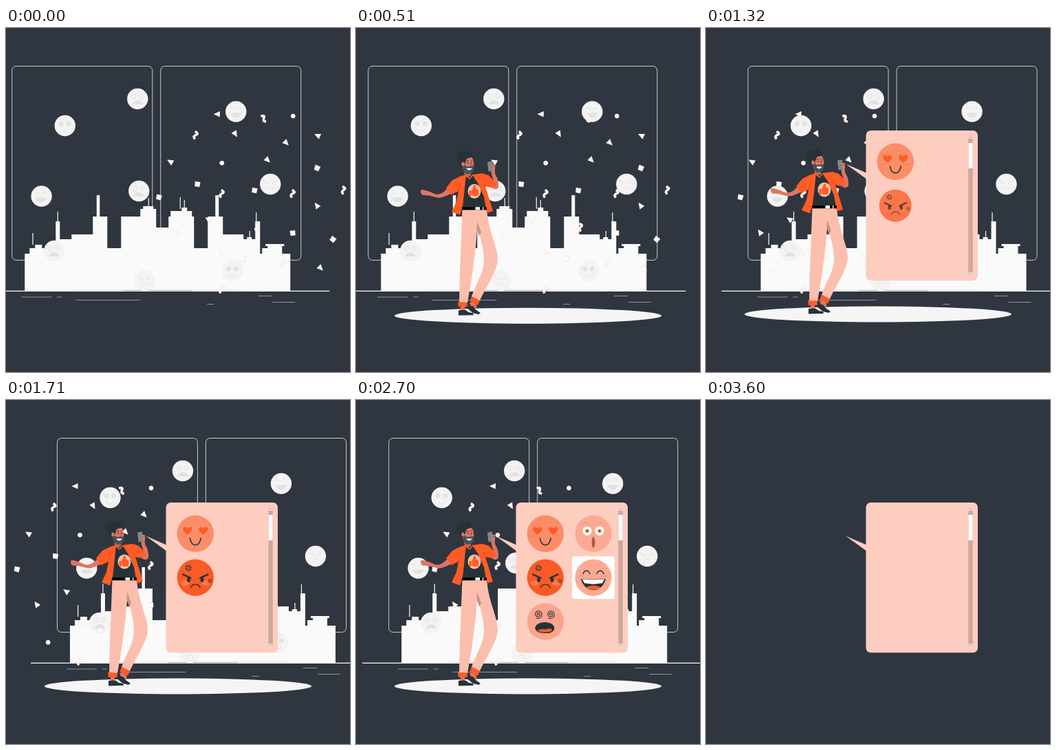
Write an HTML page with a canvas that moves like this. It is 500x500 px and loops after 3630 ms.

```html
<!DOCTYPE html>
<html lang="en">
<head>
<meta charset="utf-8">
<title>Choosing a reaction</title>
<style>
html, body { margin: 0; width: 100%; height: 100%; overflow: hidden; background: #2f3640; }
canvas { display: block; width: 100vw; height: 100vh; }
</style>
</head>
<body>
<canvas id="stage" width="500" height="500"></canvas>
<script>
const ctx = document.getElementById('stage').getContext('2d');
const LOOP = 3630, TAU = Math.PI * 2;
const BG = '#2f3640', PALE = '#fafafa', DARK = '#263238', ORANGE = '#ff5c26',
      SKIN = '#df7564', PEACH = '#fcaa93', TROUSER = '#fcbfae', PANEL = '#fdcdc0';

const clamp = v => Math.max(0, Math.min(1, v));
const outCubic = p => 1 - (1 - clamp(p)) ** 3;

// ---- Drawing helpers ----
function fill(color, path) {
  ctx.fillStyle = color;
  ctx.fill(path);
}
function stroke(color, width, path) {
  ctx.strokeStyle = color;
  ctx.lineWidth = width;
  ctx.stroke(path);
}
function oval(x, y, rx, ry = rx) {
  const p = new Path2D();
  p.ellipse(x, y, rx, ry, 0, 0, TAU);
  return p;
}
function box(x, y, w, h, r = 0) {
  const p = new Path2D();
  p.roundRect(x, y, w, h, r);
  return p;
}
function track(...pts) {
  const p = new Path2D();
  for (const [x, y] of pts) p.lineTo(x, y);
  return p;
}
// Closed curve through the points
function loop(...pts) {
  const p = new Path2D(), n = pts.length, get = i => pts[(i + n) % n];
  p.moveTo(...pts[0]);
  pts.forEach((a, i) => {
    const before = get(i - 1), b = get(i + 1), after = get(i + 2);
    p.bezierCurveTo(a[0] + (b[0] - before[0]) / 6, a[1] + (b[1] - before[1]) / 6,
      b[0] - (after[0] - a[0]) / 6, b[1] - (after[1] - a[1]) / 6, b[0], b[1]);
  });
  return p;
}
// Arch from x - w to x + w whose middle lies h below the ends
function arch(x, y, w, h) {
  const p = new Path2D();
  p.moveTo(x - w, y);
  p.bezierCurveTo(x - w * 0.7, y + h * 1.33, x + w * 0.7, y + h * 1.33, x + w, y);
  return p;
}
function at(x, y, draw, { scale = 1, turn = 0, alpha = 1 } = {}) {
  ctx.save();
  ctx.translate(x, y);
  ctx.rotate(turn);
  ctx.scale(scale, scale);
  ctx.globalAlpha *= alpha;
  draw();
  ctx.restore();
}

// ---- City ----
// Roof steps: left edge, height of the roof
const ROOFS = [
  [27, 328], [34, 320], [42, 315], [52, 320], [72, 281], [78, 307], [95, 300], [126, 274],
  [131.5, 243], [136, 274], [147, 320], [167, 274], [195, 263], [199, 259], [214, 263], [218, 290],
  [236, 274], [239, 266], [255, 261], [263, 266], [270, 274], [273, 320], [293, 274], [304, 243],
  [309, 274], [315, 300], [345, 307], [350, 304], [357, 307], [362, 281], [369, 328], [372, 320],
  [380, 314], [401, 328], [413, 382]
];
const MASTS = [[38.7, 298], [75, 267], [207, 247], [253, 246], [259, 250], [354, 295], [363.5, 268]];
const STREAKS = [[22, 66, 391], [74, 81, 391], [101, 195, 395.5], [292, 302, 401.5], [366, 386, 389.5], [387, 420, 398.5]];
const BUBBLES = [
  [85.5, 142, 'love'], [191, 103, 'sad'], [51.3, 244.5, 'laugh'], [193, 237, 'dizzy'], [70, 324, 'dizzy'],
  [201.5, 367, 'angry'], [329, 353, 'love'], [334, 121.5, 'laugh'], [384, 227, 'angry']
];

function skyline() {
  const p = new Path2D();
  let floor = 382;
  p.moveTo(27, floor);
  for (const [x, y] of ROOFS) {
    p.lineTo(x, floor);
    p.lineTo(x, floor = y);
  }
  return p;
}
function faintFace(mood) {
  const ink = '#e2e2e2';
  fill('#f3f3f3', oval(0, 0, 15.2));
  for (const x of [-5.5, 5]) {
    if (mood === 'love') fill(ink, oval(x, -3, 3.5));
    else if (mood === 'angry') stroke(ink, 1.4, track([x * 1.8, -5], [x * 0.5, -1]));
    else if (mood === 'laugh') stroke(ink, 1, arch(x, -3, 3, -3));
    else stroke(ink, 1, oval(x, -4, 3));
  }
  if (mood === 'love') stroke(ink, 1, arch(0, 5, 5, 4));
  else if (mood === 'angry') stroke(ink, 1, arch(0, 8, 5, -4));
  else fill(ink, arch(0, mood === 'laugh' ? 2 : 8, 8, mood === 'laugh' ? 7 : -6));
}
function drawCity() {
  for (const x of [8.5, 224.5]) stroke(PALE, 0.75, box(x, 55.5, 204, 282, 6));
  fill(PALE, skyline());
  fill(PALE, box(377, 314, 27, 3));
  for (const [x, y] of MASTS) stroke(PALE, 1.2, track([x, y], [x, y + 17]));
  stroke(PALE, 1.1, track([-30, 382.4], [470, 382.4]));
  stroke('#c9ccca', 0.8, track([95, 381.3], [345, 381.3]));
  stroke('#8f9493', 0.7, track([170, 381.7], [270, 381.7]));
  for (const [from, to, y] of STREAKS) stroke('#b9bdbf', 0.7, track([from, y], [to, y]));
  for (const [x, y, mood] of BUBBLES) at(x, y, () => faintFace(mood));
}

// ---- Confetti: x, y, turn in degrees ----
const TRIANGLES = [
  [307, 125, 180], [333, 154, 60], [407, 167, 45], [453, 156, 205], [380, 192, 45], [239, 194, 210],
  [452, 258, 235], [457, 349, 45], [294, 278, 215], [251, 297, 235], [314, 325, 235]
];
const SQUARES = [
  [278, 227, 5], [222, 246, 10], [361, 236, 8], [452, 203.5, 20], [416.5, 298, -8], [475, 307, 35], [344, 335, 15]
];
const RIBBONS = [
  [275, 156, 0], [374.5, 132, -45], [313, 241, 0], [416, 241, 0],
  [490, 236, -10], [364, 290, -15], [403, 342, 5], [313, 380, 5]
];
const DOTS = [[417.3, 128], [313.8, 196.3], [267.5, 352.3]];

function drawConfetti() {
  const rim = '#fbcabb', paper = '#fffaf8';
  const scatter = (list, draw) => list.forEach(([x, y, deg = 0]) => at(x, y, draw, { turn: deg * TAU / 360 }));
  const solid = path => () => {
    stroke(rim, 1, path);
    fill(paper, path);
  };
  const wave = new Path2D();
  wave.moveTo(0, -5.6);
  wave.bezierCurveTo(6, -2, 2, -1, 0, 0);
  wave.bezierCurveTo(-3, 2, -2, 3, -0.5, 5.4);
  scatter(TRIANGLES, solid(track([4.8, 0], [-3.4, -3.8], [-3.4, 3.8])));
  scatter(SQUARES, solid(track([-3.6, -3.4], [3.8, -3], [3.2, 3.5], [-3.3, 3])));
  scatter(DOTS, solid(oval(0, 0, 3)));
  scatter(RIBBONS, () => {
    stroke(rim, 3.7, wave);
    stroke(paper, 2.8, wave);
  });
}

// ---- Man ----
function drawLegs() {
  fill(SKIN, track([152, 401], [158, 401], [158, 409], [152, 409]));
  fill(SKIN, track([165, 397], [172, 395], [176, 404], [169, 406]));
  fill(DARK, track([149, 408], [159, 407.5], [164, 411], [170, 412], [171, 415], [149, 415.5]));
  fill(DARK, track([160, 402], [170, 402], [174, 407], [181, 412], [178, 414], [170, 412], [160, 404]));
  const knee = new Path2D();
  knee.moveTo(174, 262);
  knee.lineTo(190, 262);
  knee.bezierCurveTo(193, 295, 207, 318, 206, 335);
  knee.bezierCurveTo(205, 352, 188, 376, 180, 394);
  knee.lineTo(168, 388);
  knee.bezierCurveTo(174, 370, 187, 352, 186, 334);
  knee.bezierCurveTo(185, 310, 176, 292, 176, 278);
  fill(TROUSER, knee);
  fill(TROUSER, track([154.5, 261], [190, 261], [191, 276], [177, 279], [174, 316], [168, 362], [162, 397], [150, 397], [151, 350]));
  fill('#c69384', track([176, 279], [182, 295], [179, 300], [175.5, 290]));
  fill(ORANGE, track([148, 396], [162, 396.5], [161.5, 403], [149, 403]));
  fill(ORANGE, track([168, 387.5], [180, 394], [177, 401], [165.5, 395]));
}
function drawArms() {
  fill(SKIN, loop([134, 231], [126, 237], [117, 239.5], [105, 235], [95, 233], [96, 240], [107, 241.5], [120, 244.5], [130, 242], [141, 236]));
  fill(SKIN, loop([194, 221], [199, 231], [206.5, 230], [206, 218], [202, 209], [202, 199], [197, 201], [197, 210], [200, 221]));
  fill('#858585', track([191, 192.5], [198, 191.5], [199.5, 205], [192.5, 206.5]));
  fill(SKIN, box(197, 196, 5, 2.5, 1));
  fill(SKIN, box(197, 201, 5, 2.5, 1));
}
function drawTorso() {
  fill(DARK, track([156, 212], [172, 211], [182, 220], [190, 259], [154, 259]));
  fill('#c9604f', track([157, 204], [167, 204], [167, 212], [163, 215], [158, 213]));
  fill(ORANGE, track([152, 213], [160, 211], [157, 240], [155, 257], [151, 269.5], [139, 265], [146, 250], [149, 235], [138, 240], [131, 230], [140, 219]));
  fill(ORANGE, track([169, 211], [184, 209], [193, 212], [200, 219], [204, 226], [198, 230], [188, 228], [194, 247], [199, 264], [190, 266.5], [186, 243], [177, 223]));
  stroke('#c7441a', 0.7, track([149, 235], [152, 224]));
  stroke('#c7441a', 0.7, track([188, 228], [184, 221]));
  stroke(ORANGE, 1.5, track([159, 212], [165, 217], [170, 211]));
  fill(TROUSER, oval(172, 235, 9.5, 10.5));
  fill(ORANGE, box(164.5, 234, 3.3, 8, 0.5));
  fill(ORANGE, box(168.3, 232, 10, 10, 3));
  fill(ORANGE, track([168.5, 235], [171, 227], [173.5, 226], [175, 234]));
  fill('#050505', box(154, 258, 36, 4.2));
  fill('#fff', box(173.5, 258, 6.5, 4.2));
  fill('#fff', box(184, 258, 1.3, 4.2));
}
function drawHead() {
  fill(SKIN, loop([155, 190], [162, 186], [169, 187], [171, 199], [164, 208], [156, 202]));
  fill(DARK, loop([146, 184], [150, 178], [158, 176.5], [167, 178], [168, 185], [161, 188], [158, 196], [154, 200], [148, 193]));
  fill('#46525a', loop([155.5, 196], [161, 199], [167, 198.5], [171.5, 199], [169, 208], [161, 209.5], [156, 204]));
  fill(SKIN, oval(155.5, 195.5, 2.2, 3));
  fill('#fff', arch(164.5, 201.6, 4, 3));
  stroke(DARK, 0.9, track([160.5, 191.5], [164, 190.5]));
  stroke(DARK, 0.9, track([166.5, 190.5], [168.5, 191]));
  for (const x of [162.8, 168]) fill(DARK, oval(x, 194, 0.8, 1));
  stroke('#b14f40', 0.7, track([166, 193], [168, 197], [165.5, 197.5]));
}
function drawMan() {
  fill('#f5f5f5', oval(250, 416, 194, 11.5));
  drawLegs();
  drawArms();
  drawTorso();
  drawHead();
}

// ---- Panel and reactions ----
function drawPanel() {
  fill(PANEL, track([203, 197.5], [234, 211], [234, 220]));
  fill(PANEL, box(232.5, 149, 162.5, 218.3, 7));
  fill('#cca79c', box(381.3, 156.5, 6.5, 202.5));
  fill('#fff', box(381.5, 167, 6, 37));
  for (const [y, tip] of [[156.5, -1], [354.5, 1]]) {
    fill('#eee0dc', box(381.5, y, 6, 4.5));
    stroke('#9a7f77', 0.8, track([383, y + 2.2 - tip], [384.5, y + 2.2 + tip], [386, y + 2.2 - tip]));
  }
}

const disc = color => fill(color, oval(0, 0, 26.7));
const pair = (gap, draw) => [-gap, gap].forEach(draw);

function heart() {
  const p = new Path2D();
  p.moveTo(0, 5.5);
  p.bezierCurveTo(-11, -1, -6, -10, 0, -3.5);
  p.bezierCurveTo(6, -10, 11, -1, 0, 5.5);
  fill(ORANGE, p);
}
function spiral(x, y) {
  const p = new Path2D();
  for (let a = 0; a < 15; a += 0.3) p.lineTo(x + Math.cos(a) * a * 0.43, y + Math.sin(a) * a * 0.43);
  stroke(DARK, 1.1, p);
}
function vein() {
  for (let i = 0; i < 4; i++) at(0, 0, () => stroke(DARK, 1.3, track([1.3, 4.5], [1.5, 1.5], [4.5, 1.3])), { turn: i * TAU / 4 });
}
function blush(y) {
  pair(17.5, x => pair(1.5, d => stroke(ORANGE, 0.8, track([x + d - 1, y + 1], [x + d + 1, y]))));
}
function loveFace() {
  disc('#fb8d69');
  pair(11.5, x => at(x, -4, heart));
  stroke(DARK, 1.6, arch(0, 6, 8, 10.5));
  blush(3);
}
function angryFace() {
  disc('#fa5a25');
  pair(15.5, x => {
    fill('#ff7a4c', oval(x, 8, 6, 4));
    stroke(DARK, 2.4, track([x * 1.22, -5], [x * 0.39, 1]));
    fill(DARK, oval(x * 0.63, 3, 2.3, 3.8));
  });
  stroke(DARK, 1.3, arch(0, 15, 7, -5));
  at(-10, -14, vein, { turn: 0.1 });
  at(21, 5, vein, { scale: 0.65, turn: 0.3 });
}
function dizzyFace() {
  disc('#fba58c');
  spiral(-10.5, -10.5);
  spiral(7.5, -10.5);
  fill(DARK, loop([-15, 9], [-10, 3], [0, 1], [10, 4], [13, 11], [8, 16], [-1, 17], [-11, 15]));
  fill(ORANGE, loop([-11, 13], [-5, 11], [0, 11.5], [5, 10], [10, 12], [6, 15], [-5, 15.5]));
}
function shockedFace() {
  disc(PEACH);
  pair(9, x => {
    fill('#fff', oval(x, -4, 7.2));
    stroke('#d98772', 0.6, oval(x, -4, 7.2));
    fill(ORANGE, oval(x, -4, 2.5));
    fill(DARK, oval(x, -4, 1));
    stroke('#e78a72', 0.8, arch(x * 1.2, -14, 4, -2));
  });
  fill('#a85a4c', oval(0, 12.5, 2.4, 8));
}
function laughFace() {
  fill('#fff', box(-31, -31, 62, 62, 4));
  disc(PEACH);
  pair(10, x => stroke(DARK, 1.5, arch(x, -5, 5, -5)));
  blush(-3);
  fill(DARK, arch(0, 2, 18, 16));
  fill('#fff', track([-16, 2.5], [16, 2.5], [13, 8], [0, 9.5], [-13, 8]));
  fill(ORANGE, loop([-10, 14], [0, 11.5], [10, 14], [5, 17], [-5, 17]));
}
const REACTIONS = [
  [275.3, 194.3, 690, loveFace], [275.3, 258.2, 1230, angryFace], [275.3, 322, 1800, dizzyFace],
  [345, 194.3, 2170, shockedFace], [345, 258.2, 2430, laughFace]
];
function drawReactions(t) {
  for (const [x, y, start, face] of REACTIONS) {
    const p = outCubic((t - start) / 240);
    if (p > 0) at(x, y, face, { scale: 0.5 + p / 2, alpha: p });
  }
}

// ---- Timeline ----
const sway = (t, lag = 0) => (1 - Math.cos(TAU * (t - lag) / LOOP)) / 2;

function render(t) {
  fill(BG, box(0, 0, 500, 500));
  if (t >= 3600) return drawPanel();
  at(67.5 * sway(t, 72), 0, drawCity);
  at(-208 * sway(t), 0, drawConfetti);
  at(0, 330 * (1 - outCubic(t / 630)), drawMan);
  const shown = clamp((t - 570) / 240);
  if (shown > 0) at(0, 0, drawPanel, { alpha: shown });
  drawReactions(t);
}
function tick() {
  render(performance.now() % LOOP);
  requestAnimationFrame(tick);
}
tick();
</script>
</body>
</html>
```
